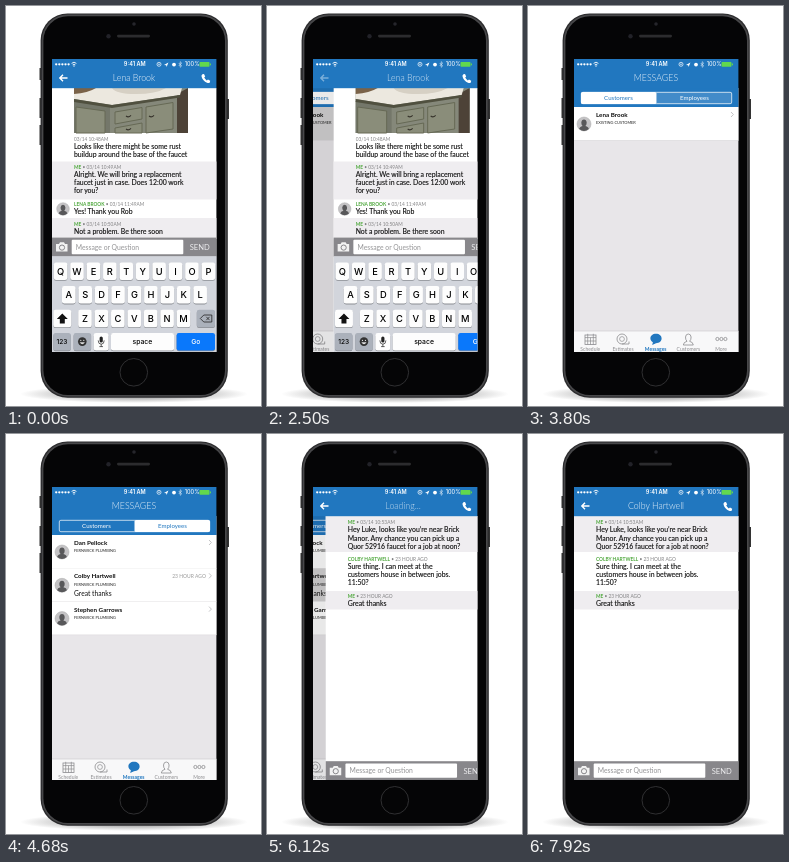
Recreate the animation shown at these times as an HTML page. Size 255x400 px, loop 7940 ms.

```html
<!DOCTYPE html>
<html lang="en">
<head>
<meta charset="utf-8">
<title>Phone messages</title>
<style>
html, body { margin: 0; width: 100%; height: 100%; overflow: hidden; background: #fff; }
svg { display: block; width: 255px; height: 400px; }
text { font-family: Lato, sans-serif; white-space: pre; }
.ui { font-family: Inter, Roboto, sans-serif; }
</style>
</head>
<body>
<svg id="stage" viewBox="0 0 255 400" xmlns="http://www.w3.org/2000/svg"></svg>
<script>
const LOOP = 7940, BLUE = '#2177bf', GREEN = '#4fa83d', WIDTH = 165;
const CUSTOMER = 'Lena Brook', WORKER = 'Colby Hartwell', FIRM = 'FERNWICK PLUMBING';

// Drawing helpers; text is placed by its vertical centre
const rect = (x, y, w, h, fill, more = '') =>
  `<rect x="${x}" y="${y}" width="${w}" height="${h}" fill="${fill}" ${more}/>`;
const circle = (x, y, r, fill, more = '') =>
  `<circle cx="${x}" cy="${y}" r="${r}" fill="${fill}" ${more}/>`;
const path = (d, fill, more = '') => `<path d="${d}" fill="${fill}" ${more}/>`;
const line = (d, color, w, more = '') =>
  path(d, 'none', `stroke="${color}" stroke-width="${w}" ${more}`);
const text = (x, y, s, size, fill, more = '') =>
  `<text x="${x}" y="${(y + size * 0.35).toFixed(2)}" font-size="${size}" fill="${fill}" ${more}>${s}</text>`;
const group = (id, body, more = '') => `<g id="${id}" ${more}>${body}</g>`;
const MID = 'text-anchor="middle"';

function phone() {
  return '<ellipse cx="128" cy="388" rx="114" ry="9" fill="url(#floor)"/>' +
    rect(33.5, 62, 2, 12, '#333') + rect(33.5, 92, 2, 20, '#333') +
    rect(33.5, 119, 2, 20, '#333') + rect(221, 93, 2, 20, '#333') +
    rect(34.6, 7.4, 187.2, 384.4, '#2a2a2c', 'rx="27"') +
    rect(35.8, 8.6, 184.8, 382, '#48484a', 'rx="26"') +
    rect(37.4, 10.2, 181.6, 378.8, '#050506', 'rx="24.5"') +
    circle(128, 18, 1.8, '#26262b') + circle(102.5, 30.2, 2.2, '#222228') +
    rect(111, 28.8, 33, 2.6, '#2c2c2e', 'rx="1.3"') +
    circle(127.8, 366.3, 13.8, '#050506', 'stroke="#303032" stroke-width="1"');
}

function statusBar() {
  let s = '';
  for (let i = 0; i < 5; i++) s += circle(50.2 + i * 3.1, 58.3, 1.15, '#fff');
  s += line('M65.6 57.4Q68 55 70.4 57.4M66.7 58.8Q68 57.5 69.3 58.8', '#fff', 0.9) + circle(68, 60, 0.7, '#fff');
  s += text(128.8, 58.3, '9:41 AM', 5.6, '#fff', MID + ' class="ui" font-weight="600"');
  s += circle(153, 58.3, 2, 'none', 'stroke="#fff" stroke-width=".7"') + circle(153, 58.3, 0.7, '#fff');
  s += path('M158 59L162.4 56.4L160.6 61L160.2 59.2Z', '#fff');
  s += circle(168, 58.6, 1.9, '#fff');
  s += line('M172.7 57L175.7 60L174.2 61.3V55.7L175.7 57L172.7 60', '#fff', 0.5);
  s += text(178.8, 58.3, '100%', 5.6, '#fff', 'class="ui"');
  return s + rect(193.5, 56.1, 10, 4.6, '#62d84e', 'rx=".8"') + rect(204, 57.5, 1, 1.8, '#62d84e');
}

const avatar = (x, y, r) => `<g transform="translate(${x} ${y}) scale(${r / 7})">` +
  circle(0, 0, 7, '#c4c3c5', 'stroke="#aaa" stroke-width=".5"') +
  path('M-4.8 5Q-4.6 2.6-1.4 1.9Q-2.8.4-2.7-1.6Q-2.4-4.6 0-4.6Q2.4-4.6 2.7-1.6Q2.8.4 1.4 1.9Q4.6 2.6 4.8 5Q0 8.8-4.8 5Z', '#58585a') + '</g>';

// Segmented switch; `right` selects the second half
function segments(right) {
  const x = right ? 128.5 : 53;
  const label = (cx, s, on) => text(cx, 92, s, 6.1, on ? BLUE : '#fff', MID);
  return rect(46, 82, WIDTH, 19, BLUE) +
    rect(53.3, 86.3, 150.4, 11.4, 'none', 'rx="1.6" stroke="#fff" stroke-width=".7"') +
    rect(x, 86, 75.5, 12, '#fff', 'rx="1.6"') +
    label(90.5, 'Customers', !right) + label(166.5, 'Employees', right);
}

function listRow(y, name, sub, id, stamp, last) {
  let s = rect(46, y, WIDTH, 33.4, '#fff') + rect(46, y, WIDTH, 33.4, '#d3d2d3', `id="${id}" opacity="0"`) +
    rect(46, y + 33, WIDTH, 0.6, '#d9d8da') + avatar(56, y + 17, 7) +
    text(68, y + 7.7, name, 6.3, '#111', 'font-weight="700"') +
    text(68, y + 16, sub, 3.95, '#222') +
    line(`M203 ${y + 5}L205.4 ${y + 7.5}L203 ${y + 10}`, '#b5b5b8', 0.8);
  if (stamp) s += text(200, y + 8, stamp, 5, '#999', 'text-anchor="end"');
  if (last) s += text(68, y + 25.5, last, 6.7, '#111');
  return s;
}

function tabBar() {
  const G = '#8c8c8f';
  let s = rect(46, 325, WIDTH, 21, '#f8f8f9') + rect(46, 324.7, WIDTH, 0.6, '#c9c8ca');
  s += rect(57, 329, 11, 9.5, 'none', `stroke="${G}" stroke-width=".8"`) +
    line('M57 331.6H68M59.7 327.8V338.5M62.5 331.6V338.5M65.3 327.8V338.5M57 335H68', G, 0.7);
  s += circle(94, 333, 5, 'none', `stroke="${G}" stroke-width=".8"`) +
    circle(94, 333, 2.4, 'none', `stroke="${G}" stroke-width=".7"`) + line('M94 338H101V335.5', G, 0.8);
  s += path('M128 327.8C131.3 327.8 133.6 329.9 133.6 332.5S131.3 337.2 128 337.2L124.2 339L124.9 336.2C123.3 335.2 122.4 334 122.4 332.5C122.4 329.9 124.7 327.8 128 327.8Z', BLUE);
  s += line('M155.3 339Q155.6 336 159 335.3Q157.4 333.7 157.5 331Q157.8 328 160.3 328T163.1 331Q163.2 333.7 161.6 335.3Q165 336 165.3 339Z', G, 0.8);
  for (let i = 0; i < 3; i++) s += circle(189.4 + i * 4, 333, 1.6, 'none', `stroke="${G}" stroke-width=".8"`);
  ['Schedule', 'Estimates', 'Messages', 'Customers', 'More'].forEach((name, i) => {
    const on = i === 2;
    s += text(62.3 + i * 32.7, 343, name, 5, on ? BLUE : G, MID + (on ? ' font-weight="700"' : ''));
  });
  return s;
}

// Each line: [y, words]
const lines = list => list.map(([y, s]) => text(68, y, s, 6.9, '#111', 'stroke="#111" stroke-width=".12"')).join('');
const stamp = (y, who, when) => text(68, y,
  (who ? `<tspan fill="${GREEN}" font-weight="700">${who}</tspan> • ` : '') + when, 4.8, '#808082');
const band = (y, h) => rect(46, y, WIDTH, h, '#efedf0');

function inputBar(y, caret) {
  return rect(46, y, WIDTH, 19, '#88878b') +
    path(`M50 ${y + 6.5}H53L54 ${y + 4.7}H58L59 ${y + 6.5}H61.5V${y + 14}H50Z`, '#f2f2f2') +
    circle(56, y + 10, 2.6, '#f2f2f2', 'stroke="#88878b" stroke-width="1"') +
    rect(65.7, y + 2.2, 111.6, 14.4, '#fff', 'rx="1"') +
    text(69.8, y + 9.8, 'Message or Question', 6.8, '#949496') +
    (caret ? rect(69, y + 5, 0.9, 8.6, '#3f6fe0', 'id="caret"') : '') +
    text(183.7, y + 9.8, 'SEND', 7.6, '#ececee');
}

function keyboard() {
  const DARK = '#abb1bb';
  const key = (x, y, w, fill) => rect(x, y + 0.8, w, 17.5, '#8b8e94', 'rx="2.3"') + rect(x, y, w, 17.5, fill, 'rx="2.3"');
  const glyph = (x, y, s, size, fill = '#000') => text(x, y, s, size, fill, MID + ' class="ui" font-weight="500"');
  let s = rect(46, 250.3, WIDTH, 96, '#d2d5dc');
  [['QWERTYUIOP', 54.6], ['ASDFGHJKL', 62.8], ['ZXCVBNM', 79]].forEach(([row, x0], r) => {
    [...row].forEach((c, i) => {
      const x = x0 + i * 16.42, y = 256.5 + r * 23.6;
      s += key(x - 6.8, y, 13.6, '#fdfdfd') + glyph(x, y + 8.8, c, 9.3);
    });
  });
  s += key(47.3, 303.7, 18, '#fdfdfd') + path('M56.3 307.5L61.8 313H58.8V317.5H53.8V313H50.8Z', '#111');
  s += key(190.8, 303.7, 18.2, DARK) +
    line('M194.3 312.5L197.8 309H205.8V316H197.8ZM200.3 310.8L203.6 314.2M203.6 310.8L200.3 314.2', '#222', 0.8);
  s += key(47.3, 327, 17.5, DARK) + glyph(56, 335.6, '123', 6.6);
  s += key(67.6, 327, 17.5, DARK) + circle(76.3, 335.6, 4.3, '#333') +
    circle(74.8, 334.4, 0.6, '#ddd') + circle(77.8, 334.4, 0.6, '#ddd') + path('M73.7 336.3H78.9Q76.3 340 73.7 336.3Z', '#ddd');
  s += key(87.7, 327, 14.8, '#fdfdfd') + rect(93.6, 330.4, 3.2, 6.2, '#222', 'rx="1.6"') +
    line('M92.2 334.4Q92.2 338.2 95.2 338.2T98.2 334.4M95.2 338.2V340.6M93.4 340.6H97', '#222', 0.7);
  s += key(105, 327, 63, '#fdfdfd') + glyph(136.4, 335.6, 'space', 6.8);
  return s + key(170.6, 327, 38.4, '#0a78fb') + glyph(189.8, 335.6, 'Go', 6.8, '#fff');
}

function photo() {
  const panel = d => path(d, '#8a8d7a', 'stroke="#666955" stroke-width="1"');
  const pull = (x, y) => line(`M${x} ${y}q2.5 2 5 -.6`, '#37342c', 1.1);
  return rect(68, 82, 114, 45, '#85887a') +
    path('M68 95L104 100V127H68Z', '#74776a') +
    path('M171 88L182 82V127H171Z', '#4d4237') +
    path('M68 82H176L174 89L106 99L68 93Z', '#ece8df') +
    path('M68 82H90Q82 87 68 88Z', '#7a6248') +
    path('M106 82H160Q150 88 130 88T106 82Z', '#d6d0c4') +
    path('M68 93L106 99L174 89V91.5L106 102L68 96Z', '#50503f') +
    panel('M70 101L99 105V127H70Z') +
    panel('M109 106L136 101.5V113L109 118Z') + panel('M140 101L167 96.5V123L140 127Z') +
    panel('M109 122L136 117V127H109Z') +
    pull(120, 110) + pull(120, 123) + pull(143, 110);
}

const chatOne = () => rect(46, 82, WIDTH, 264, '#fff') + photo() +
  stamp(133.3, '', '03/14 10:48AM') +
  lines([[141, 'Looks like there might be some rust'], [149, 'buildup around the base of the faucet']]) +
  band(155.5, 38) + stamp(161.5, 'ME', '03/14 10:49AM') +
  lines([[169, 'Alright. We will bring a replacement'], [177, 'faucet just in case. Does 12:00 work'], [185, 'for you?']]) +
  avatar(57, 203, 6.3) + stamp(198.3, CUSTOMER.toUpperCase(), '03/14 11:49AM') + lines([[206, 'Yes! Thank you Rob']]) +
  band(212, 21) + stamp(218, 'ME', '03/14 10:50AM') + lines([[225.5, 'Not a problem. Be there soon']]) +
  inputBar(231.6, true) + keyboard();

const chatTwo = () => rect(46, 82, WIDTH, 264, '#fff') +
  band(82, 36) + stamp(88.7, 'ME', '03/14 10:53AM') +
  lines([[96, 'Hey Luke, looks like you’re near Brick'], [104.2, 'Manor. Any chance you can pick up a'], [112.3, 'Quor 52916 faucet for a job at noon?']]) +
  stamp(125.5, WORKER.toUpperCase(), '23 HOUR AGO') +
  lines([[132.5, 'Sure thing. I can meet at the'], [140.7, 'customers house in between jobs.'], [148.8, '11:50?']]) +
  band(157, 18.5) + stamp(162.6, 'ME', '23 HOUR AGO') + lines([[169.5, 'Great thanks']]) +
  inputBar(327.2, false);

const title = id => text(128, 72.4, '', 8.8, '#eaf3fb', MID + ` id="${id}" font-weight="300"`);

const stage = document.getElementById('stage');
stage.innerHTML = '<defs><clipPath id="screen"><rect x="46" y="53" width="164.4" height="293"/></clipPath>' +
  '<radialGradient id="floor"><stop offset=".5" stop-color="#bbb"/><stop offset="1" stop-color="#fff"/></radialGradient></defs>' +
  phone() + '<g clip-path="url(#screen)">' +
  group('list', rect(46, 82, WIDTH, 264, '#e8e6e9') +
    group('customers', segments(false) + rect(128.5, 86, 75.5, 12, '#fff', 'id="press" opacity="0"') +
      listRow(101, CUSTOMER, 'EXISTING CUSTOMER', 'pickOne')) +
    group('employees', segments(true) + listRow(101, 'Dan Pellock', FIRM, 'pickNone') +
      listRow(134.3, WORKER, FIRM, 'pickTwo', '23 HOUR AGO', 'Great thanks') +
      listRow(167.6, 'Stephen Garrows', FIRM, 'pickLast')) +
    tabBar()) +
  rect(46, 82, WIDTH, 264, '#000', 'id="dim"') +
  group('one', chatOne()) + group('two', chatTwo()) +
  rect(46, 53, WIDTH, 29.2, BLUE) + statusBar() + title('listTitle') + title('chatTitle') +
  group('back', line('M61.5 72H54M57 68.8L53.8 72L57 75.2', '#fff', 1.4)) +
  group('call', path('M196.4 68.2L198 68L199.2 70.4L198.2 71.6Q199 73.4 200.8 74.4L202 73.4L204.2 74.8L203.8 76.4Q202.8 77.4 201 76.8Q196.8 75 195.6 70.8Q195.2 69 196.4 68.2Z', '#fff')) +
  '</g>';

const el = {};
stage.querySelectorAll('[id]').forEach(n => el[n.id] = n);
el.listTitle.textContent = 'MESSAGES';

const clamp = v => Math.max(0, Math.min(1, v));
const ramp = (t, a, b) => clamp((t - a) / (b - a));
const spring = v => 1 - (1 + v) * Math.exp(-v);
const alpha = (n, v) => n.setAttribute('opacity', clamp(v).toFixed(3));
const shift = (n, x) => n.setAttribute('transform', `translate(${x.toFixed(2)} 0)`);
const show = (n, on) => n.setAttribute('display', on ? 'inline' : 'none');

function draw(t) {
  const popping = t < 3100, pushed = t >= 6060;
  // cover: how far the chat lies over the list
  let cover = 0;
  if (t < 2440) cover = 1;
  else if (popping) cover = 1 - spring((t - 2440) * 0.01);
  else if (pushed) cover = t < 6460 ? spring((t - 5770) * 0.012) : 1;

  show(el.one, popping);
  show(el.two, pushed);
  shift(el.one, WIDTH * (1 - cover));
  shift(el.two, WIDTH * (1 - cover));
  shift(el.list, -49.5 * cover);
  alpha(el.dim, 0.1 * cover);

  show(el.customers, t < 4160);
  show(el.employees, t >= 4160);
  alpha(el.press, 0.15 * ramp(t, 3660, 3800));
  alpha(el.pickOne, 1 - ramp(t, 2740, 3080));
  alpha(el.pickTwo, ramp(t, 5740, 5820));

  const blink = 0.5 - Math.cos(t / 1000 * 2 * Math.PI) / 2;
  alpha(el.caret, t < 2440 ? (blink - 0.3) * 2.5 : 0);

  el.chatTitle.textContent = popping ? CUSTOMER : t < 6440 ? 'Loading...' : WORKER;
  shift(el.chatTitle, 105 * (1 - cover));
  alpha(el.chatTitle, popping ? cover : cover ** 3);
  shift(el.listTitle, -45 * cover);
  alpha(el.listTitle, 1 - cover * 4);
  const icons = pushed ? 1 : cover * 2;
  alpha(el.call, icons);
  alpha(el.back, t < 2440 ? 1 - 0.6 * ramp(t, 2320, 2400) : Math.min(icons, popping ? 0.4 : 1));
}

function tick() {
  draw(performance.now() % LOOP);
  requestAnimationFrame(tick);
}
tick();
</script>
</body>
</html>
```
